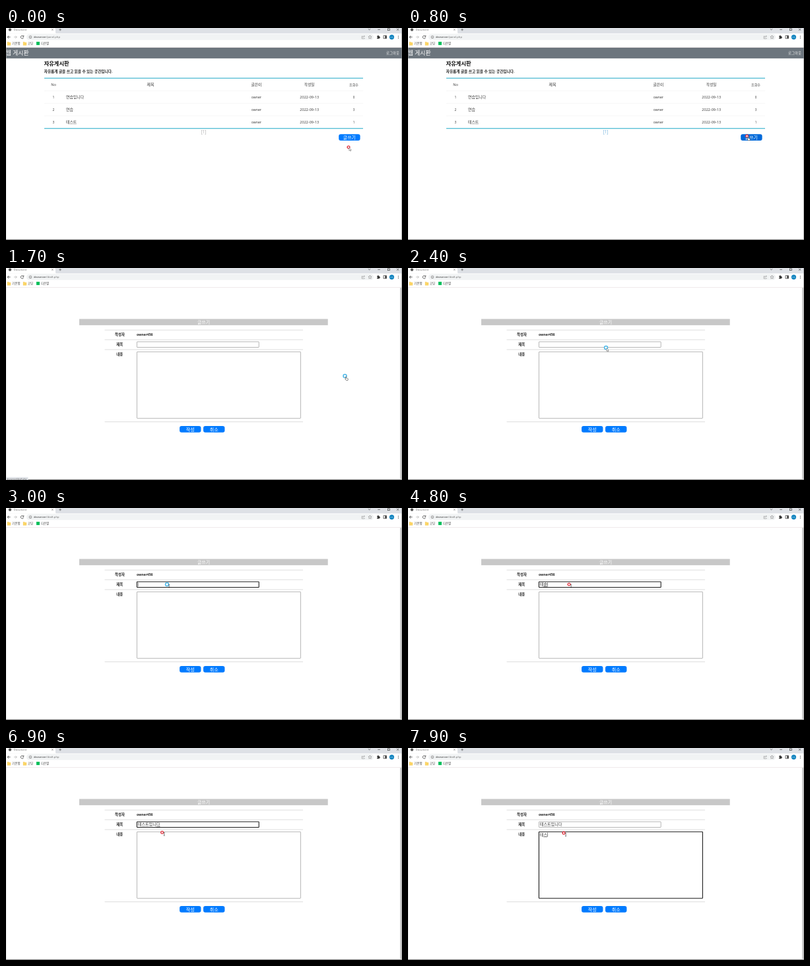
Animation of 600 by 322 pixels, one loop 8 s. Source, as an HTML page:

```html
<!DOCTYPE html>
<html lang="ko">
<head>
<meta charset="utf-8">
<title>Document</title>
<style>
html, body { margin: 0; width: 100%; height: 100%; overflow: hidden; background: #fff; }
svg { display: block; width: 600px; height: 322px; font-family: "Open Sans", "Noto Sans CJK KR", sans-serif; }
</style>
</head>
<body>
<svg id="stage" viewBox="0 0 600 322"></svg>
<script>
const LOOP = 8000;
const BLUE = '#007bff';

const rect = (x, y, w, h, fill, more = '') =>
  `<rect x="${x}" y="${y}" width="${w}" height="${h}" fill="${fill}" ${more}/>`;
const text = (x, y, size, str, fill = '#333', more = '') =>
  `<text x="${x}" y="${y}" font-size="${size}" fill="${fill}" ${more}>${str}</text>`;
const mid = (x, y, size, str, fill, more = '') =>
  text(x, y, size, str, fill, 'text-anchor="middle" ' + more);
const path = (d, stroke, width = 0.7, fill = 'none', more = '') =>
  `<path d="${d}" stroke="${stroke}" stroke-width="${width}" fill="${fill}" ${more}/>`;
const dot = (x, y, r, fill, more = '') =>
  `<circle cx="${x}" cy="${y}" r="${r}" fill="${fill}" ${more}/>`;
const group = (id, body) => `<g id="${id}">${body}</g>`;
const button = (x, y, label, id = '') =>
  rect(x, y, 32.4, 9.8, BLUE, `rx="3" ${id && `id="${id}"`}`) + mid(x + 16.2, y + 7.5, 7, label, '#fff');
const bold = 'font-weight="700"';

function folder(x) {
  return path(`M${x} 21.2h2l.7 .8h2.3v4.3h-5z`, '#f0c24b', 0.3, '#fcd667');
}

function browser() {
  const dark = '#444';
  return rect(0, 0, 600, 8.5, '#dee1e6')
    + path('M0 8.5V0H73q2 0 2 2V6.5q0 2 2 2z', 'none', 0, '#fff')
    + dot(6, 2.6, 2.2, '#555')
    + text(11.8, 4.2, 4, 'Document', '#666')
    + path('M69.2 1.3l2.4 2.4m0-2.4l-2.4 2.4', dark, 0.5)
    + path('M80.3 2.6h3.6M82.1 .8v3.6', dark, 0.6)
    + path('M548.8 1.3l1.7 1.5 1.7-1.5M563.3 2.4h3.6M592 .7l3.2 3.2m0-3.2l-3.2 3.2', '#333', 0.6)
    + rect(578.4, 0.8, 3, 2.9, 'none', 'stroke="#333" stroke-width=".6"')
    + rect(0, 8.5, 600, 20.8, '#fff')
    + rect(31, 9.3, 526, 9, '#f1f3f4', 'rx="4.5"')
    + path('M6.6 13.8H2.2m2.1-2.1l-2.1 2.1 2.1 2.1', dark, 0.8)
    + path('M12 13.8h4.4m-2.1-2.1l2.1 2.1-2.1 2.1', '#bbb', 0.8)
    + path('M26.3 12.6a2.2 2.2 0 1 0 .3 1.9M26.8 11.2v1.9h-1.9', dark, 0.8)
    + dot(37, 13.8, 1.9, 'none', 'stroke="#666" stroke-width=".6"')
    + path('M37 13.4v1.5M37 12.6v.4', '#666', 0.5)
    + `<text id="url" x="42" y="15.3" font-size="4.15" fill="#666"><tspan fill="#222">devserver</tspan><tspan id="file"></tspan></text>`
    + path('M540.8 12.5h-1.6v3.6h4v-1M540.6 14.6q.3-2.1 2.7-2.1m-1-1.1l1.2 1.1-1.2 1.1', '#777', 0.5)
    + path('M551.5 11.2l.8 1.7 1.8.2-1.3 1.2.3 1.9-1.6-.9-1.6.9.3-1.9-1.3-1.2 1.8-.2z', '#666', 0.5)
    + path('M562 12.3h1.2q-.2-1.3.7-1.3t.7 1.3h1.3v1.2q1.2-.2 1.2.7t-1.2.7v1.4H562v-1.3q1.2 0 1.2-.8t-1.2-.7z', 'none', 0, '#333')
    + rect(572, 11.7, 4.4, 4.2, 'none', 'stroke="#333" stroke-width=".7"')
    + rect(574.4, 11.7, 2, 4.2, '#333')
    + dot(584.5, 13.8, 3.6, '#0b80bd')
    + mid(584.5, 14.9, 2.8, '다온', '#d5ecf7')
    + [12, 13.8, 15.6].map(y => dot(594.4, y, 0.55, dark)).join('')
    + folder(2) + text(9, 25.4, 4.6, '기본함', '#444')
    + folder(26) + text(33, 25.4, 4.4, '코딩', '#444')
    + rect(46, 20.9, 5, 5, '#08bf5b') + text(53, 25.4, 4.4, '다온별', '#444')
    + rect(0, 29, 600, 0.6, '#e6dcde');
}

function boardPage() {
  const cols = [72, 0, 379.3, 459.7, 527];
  const rows = [['연습입니다', 0], ['연습', 3], ['테스트', 1]];
  let out = rect(0, 29.6, 600, 16.6, '#6c757d')
    + text(-0.3, 41.2, 8.9, '웹 게시판', '#fff')
    + text(576, 40, 5.45, '로그아웃', '#eee')
    + text(57.7, 57.2, 8.25, '자유게시판', '#111', bold)
    + text(57.7, 68, 5.65, '자유롭게 글을 쓰고 읽을 수 있는 공간입니다.', '#222', 'font-weight="600"')
    + rect(58, 75.6, 483, 1.3, '#52bcd3') + rect(58, 151.9, 483, 1.3, '#52bcd3')
    + mid(72, 88.3, 5.5, 'No') + mid(219, 88.3, 5.9, '제목')
    + mid(cols[2], 88.3, 5.7, '글쓴이') + mid(cols[3], 88.3, 5.5, '작성일')
    + mid(cols[4], 88.1, 5, '조회수');
  rows.forEach(([title, views], i) => {
    const y = 107.2 + 19 * i;
    out += rect(58, y - 12, 483, 0.5, '#eee')
      + mid(cols[0], y, 5, i + 1) + text(91, y, 5.9, title)
      + mid(cols[2], y, 5.2, 'owner') + mid(cols[3], y, 5.5, '2022-09-13')
      + mid(cols[4], y - 0.2, 4.6, views);
  });
  return out + mid(299.5, 159.9, 6.5, '[1]', '#aaa', 'id="pager"')
    + button(504.2, 161.2, '글쓰기', 'write');
}

function writePage() {
  return rect(111, 77.4, 376.7, 9.5, '#c8c8c8')
    + mid(299.5, 84.7, 6.9, '글쓰기', '#fff')
    + [93.8, 108.6, 123.6, 233.4].map(y => rect(149.5, y, 300.5, 0.7, '#cfcfcf')).join('')
    + mid(172.5, 103.2, 5.4, '작성자', '#222', bold)
    + mid(172.2, 117.9, 5.4, '제목', '#222', bold)
    + mid(172.2, 133.2, 5.4, '내용', '#222', bold)
    + text(198, 103.2, 5.02, 'owner456', '#222', bold)
    + rect(198.4, 112, 184.8, 8.5, '#fff', 'id="titleBox" rx=".6"')
    + rect(198.4, 127.3, 248, 101, '#fff', 'id="bodyBox" rx=".6"')
    + rect(596.8, 30, 3.2, 291, '#f1f1f1') + rect(597.3, 30, 1.6, 290, '#c4c4c4')
    + button(263, 240, '작성') + button(299, 240, '취소')
    + group('titleText', '') + group('bodyText', '');
}

function pointer() {
  return group('ring', dot(0, 0, 2.4, '#fff', 'id="hoop"'))
    + group('arrow', path('M.8 .6V5.3l1.1-1 .8 1.8.9-.4-.8-1.7h1.5z', '#333', 0.4, '#fff'))
    + group('hand', path('M1.2 1.2q.6-.6 1 0V3.2l2 .5q.8.2.7 1L4.5 6.6H1.9L.2 4.4q.3-.7 1 0z', '#222', 0.5, '#fff'))
    + group('beam', path('M2.2 .1q.8 0 .9.5.1-.5.9-.5M3.1 .5V4.6M2.2 5q.8 0 .9-.5.1.5.9.5', '#222', 0.6));
}

const stage = document.getElementById('stage');
stage.innerHTML = rect(0, 0, 600, 322, '#fff')
  + group('board', boardPage()) + group('form', writePage()) + browser()
  + rect(0, 29.6, 0.4, 292, '#ccc') + rect(599.4, 0, 0.6, 322, '#888') + rect(0, 320.9, 600, 1.1, '#858585')
  + group('status', rect(0, 317.7, 33.5, 4.3, '#dee1e6') + text(1, 322, 3.3, 'devserver/draft.php', '#555'))
  + group('pointer', pointer());

const el = {};
stage.querySelectorAll('[id]').forEach(n => el[n.id] = n);
const show = (id, on) => el[id].setAttribute('visibility', on ? 'visible' : 'hidden');

// pointer path: time, x, y
const moves = [
  [100, 519, 181], [850, 513.5, 164], [1750, 513.5, 164], [2400, 300, 121],
  [2800, 244, 116], [6650, 244, 116], [6950, 236, 129.2]
];
// typed states: time, text
const titleKeys = [
  [2800, ''], [4200, 'ㅌ'], [4400, '테'], [4600, '텟'], [4700, '테스'], [4800, '테슽'],
  [5000, '테스트'], [5200, '테스틍'], [5300, '테스트이'], [5400, '테스트입'],
  [5600, '테스트입ㄴ'], [5700, '테스트입니'], [5900, '테스트입닏'], [6000, '테스트입니다']
];
const bodyKeys = [[7000, ''], [7500, 'ㅌ'], [7600, '테'], [7800, '텟'], [7900, '테스']];

function place(t) {
  const i = moves.findIndex(m => m[0] > t);
  if (i === 0) return moves[0].slice(1);
  if (i < 0) return moves[moves.length - 1].slice(1);
  const a = moves[i - 1], b = moves[i];
  const u = (t - a[0]) / (b[0] - a[0]);
  const e = u * u * (3 - 2 * u);
  return [a[1] + (b[1] - a[1]) * e, a[2] + (b[2] - a[2]) * e];
}

function field(id, keys, t, y, focused) {
  const key = keys.filter(k => k[0] <= t).pop();
  const str = key ? key[1] : '';
  const size = 6.1, step = size * 0.92, x = 199.8;
  const end = x + str.length * step;
  let out = text(x, y, size, str, '#333');
  if (focused && str) out += rect(end - step, y + 1, step, 0.5, '#333');
  if (focused && (t - key[0]) % 1000 < 500) out += rect(end + 0.1, y - 5.2, 0.5, 6.2, '#111');
  el[id].innerHTML = out;
}

function frameBox(id, focused) {
  el[id].setAttribute('stroke', focused ? '#1c1c1c' : '#858585');
  el[id].setAttribute('stroke-width', focused ? 1.1 : 0.6);
}

function draw(t) {
  const onForm = t >= 1700;
  const inTitle = t >= 2800 && t < 7000, inBody = t >= 7000;
  show('board', !onForm);
  show('form', onForm);
  show('status', t >= 1000 && t < 2100);
  el.file.textContent = t < 1600 ? '/panel.php' : '/draft.php';
  el.pager.setAttribute('fill', t < 200 ? '#aaa' : '#6fb0dc');

  const [x, y] = place(t);
  const overButton = !onForm && y < 170;
  el.write.setAttribute('fill', !overButton ? BLUE : t < 1100 ? '#0069d9' : '#0050a4');

  frameBox('titleBox', inTitle);
  frameBox('bodyBox', inBody);
  field('titleText', titleKeys, t, 118.4, inTitle);
  field('bodyText', bodyKeys, t, 133.7, inBody);

  const px = x + 3, py = y + 2.5;
  const overField = onForm && px > 198 && (
    (px < 383 && py > 112 && py < 120.5) || (px < 446 && py > 127 && py < 228));
  const hand = overButton || (onForm && t < 1800);
  show('hand', hand);
  show('beam', overField && !hand);
  show('arrow', !overField && !hand);

  const red = t < 1500 || t >= 4000;
  el.hoop.setAttribute('r', red ? 1.9 : 2.5);
  el.hoop.setAttribute('stroke', red ? '#e0323f' : '#4fb9e8');
  el.hoop.setAttribute('stroke-width', red ? 1.4 : 1.5);
  el.pointer.setAttribute('transform', `translate(${x} ${y})`);
}

function tick() {
  draw(performance.now() % LOOP);
  requestAnimationFrame(tick);
}
tick();
</script>
</body>
</html>
```
